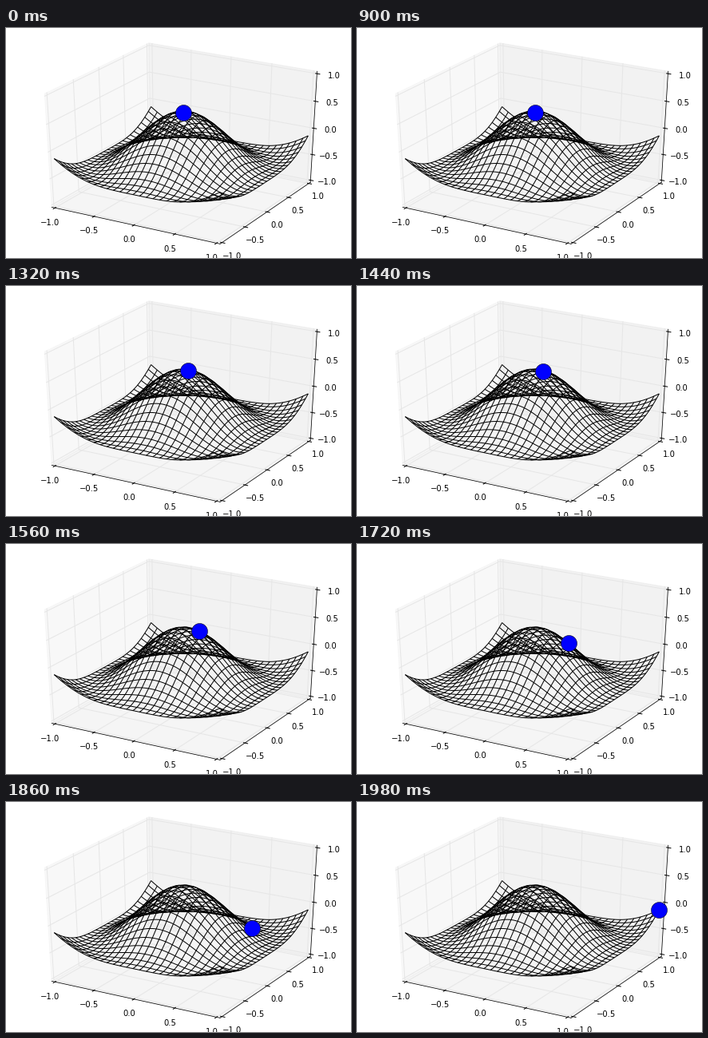
Animation, 432 px wide and 288 px high, one loop 2000 ms. Source, as a matplotlib script:

```python
import numpy as np
import matplotlib.pyplot as plt
from matplotlib.animation import FuncAnimation
from matplotlib.collections import LineCollection

W, H, DPI = 432, 288, 72
FRAMES, INTERVAL = 100, 20
DIST = 10
ELEV, AZIM = np.radians(30), np.radians(-60)
TICKS = np.linspace(-1, 1, 5)
LO, HI = -1 - 1 / 24, 1 + 1 / 24    # box reaches a little past the data
OUT, IN = 1 / 30, 1 / 60            # tick lengths
PAD = 7 / 60                        # gap from box to tick labels
STRIDE = 4                          # samples between mesh lines

normal = np.array([np.cos(AZIM) * np.cos(ELEV),
                   np.sin(AZIM) * np.cos(ELEV),
                   np.sin(ELEV)])
right = np.array([-np.sin(AZIM), np.cos(AZIM), 0])
up = np.cross(normal, right)


def project(points):
    """Perspective view of points in [-1, 1]^3, in pixels with y upwards."""
    p = np.asarray(points, float) / 2
    depth = DIST - p @ normal
    x = (p @ right) / depth
    y = (p @ up) / depth
    return np.stack([(x + 0.095) / 0.185 * W, (y + 0.095) / 0.185 * H], axis=-1)


def height(x, y):
    return 0.5 * np.cos(np.pi * np.hypot(x, y))


def draw_line(points, **style):
    xy = project(points)
    ax.plot(xy[:, 0], xy[:, 1], **style)


def draw_pane(points, shade):
    ax.add_patch(plt.Polygon(project(points), fc=shade, ec=shade, lw=1,
                             alpha=0.5, zorder=0))


def draw_label(value, point, dx, dy):
    x, y = project(point)
    text = f"{value:.1f}".replace("-", "\u2212")
    ax.text(x + dx, y + dy, text, ha="center", va="baseline",
            fontsize=10, color="k", family="DejaVu Sans")


fig = plt.figure(figsize=(W / DPI, H / DPI), dpi=DPI, facecolor="w")
ax = fig.add_axes([0, 0, 1, 1])
ax.set_xlim(0, W)
ax.set_ylim(0, H)
ax.axis("off")

draw_pane([(LO, LO, LO), (LO, HI, LO), (LO, HI, HI), (LO, LO, HI)], "0.95")
draw_pane([(LO, HI, LO), (HI, HI, LO), (HI, HI, HI), (LO, HI, HI)], "0.90")
draw_pane([(LO, LO, LO), (HI, LO, LO), (HI, HI, LO), (LO, HI, LO)], "0.925")

grid = dict(color="0.9", lw=1, zorder=1)
for t in TICKS:
    draw_line([(t, LO, LO), (t, HI, LO), (t, HI, HI)], **grid)
    draw_line([(HI, t, LO), (LO, t, LO), (LO, t, HI)], **grid)
    draw_line([(LO, LO, t), (LO, HI, t), (HI, HI, t)], **grid)

edge = dict(color="k", lw=0.75, zorder=2)
draw_line([(LO, LO, LO), (HI, LO, LO)], **edge)
draw_line([(HI, LO, LO), (HI, HI, LO)], **edge)
draw_line([(HI, HI, LO), (HI, HI, HI)], **edge)

tick = dict(color="k", lw=1, zorder=2)
for t in TICKS:
    draw_line([(t, LO - OUT, LO), (t, LO + IN, LO)], **tick)
    draw_line([(HI + OUT, t, LO), (HI - IN, t, LO)], **tick)
    draw_line([(HI + OUT, HI, t), (HI - IN, HI, t)], **tick)
    draw_label(t, (t, LO - PAD, LO - PAD), 0.75, -9.5)
    draw_label(t, (HI + PAD, t, LO - PAD), 0.75, -9.5)
    draw_label(t, (HI + PAD, HI + PAD, t), 3.2, -7)

side = np.linspace(-1, 1, 100)
gx, gy = np.meshgrid(side, side)
mesh = project(np.stack([gx, gy, height(gx, gy)], axis=-1))
keep = np.append(np.arange(0, side.size, STRIDE), side.size - 1)
lines = list(mesh[keep]) + list(mesh.transpose(1, 0, 2)[keep])
ax.add_collection(LineCollection(lines, colors="k", linewidths=1, zorder=3))

ball, = ax.plot([], [], "o", ms=20, mfc="b", mec="k", mew=0.5, zorder=4)


def update(i):
    # The ball leaves the unstable top at an exponential rate.
    s = np.exp(-0.1 * (FRAMES - 1 - i))
    x, y = project((s, s, height(s, s)))
    ball.set_data([x], [y])
    return ball,


anim = FuncAnimation(fig, update, frames=FRAMES, interval=INTERVAL,
                     repeat=True, repeat_delay=0)
plt.show()
```
